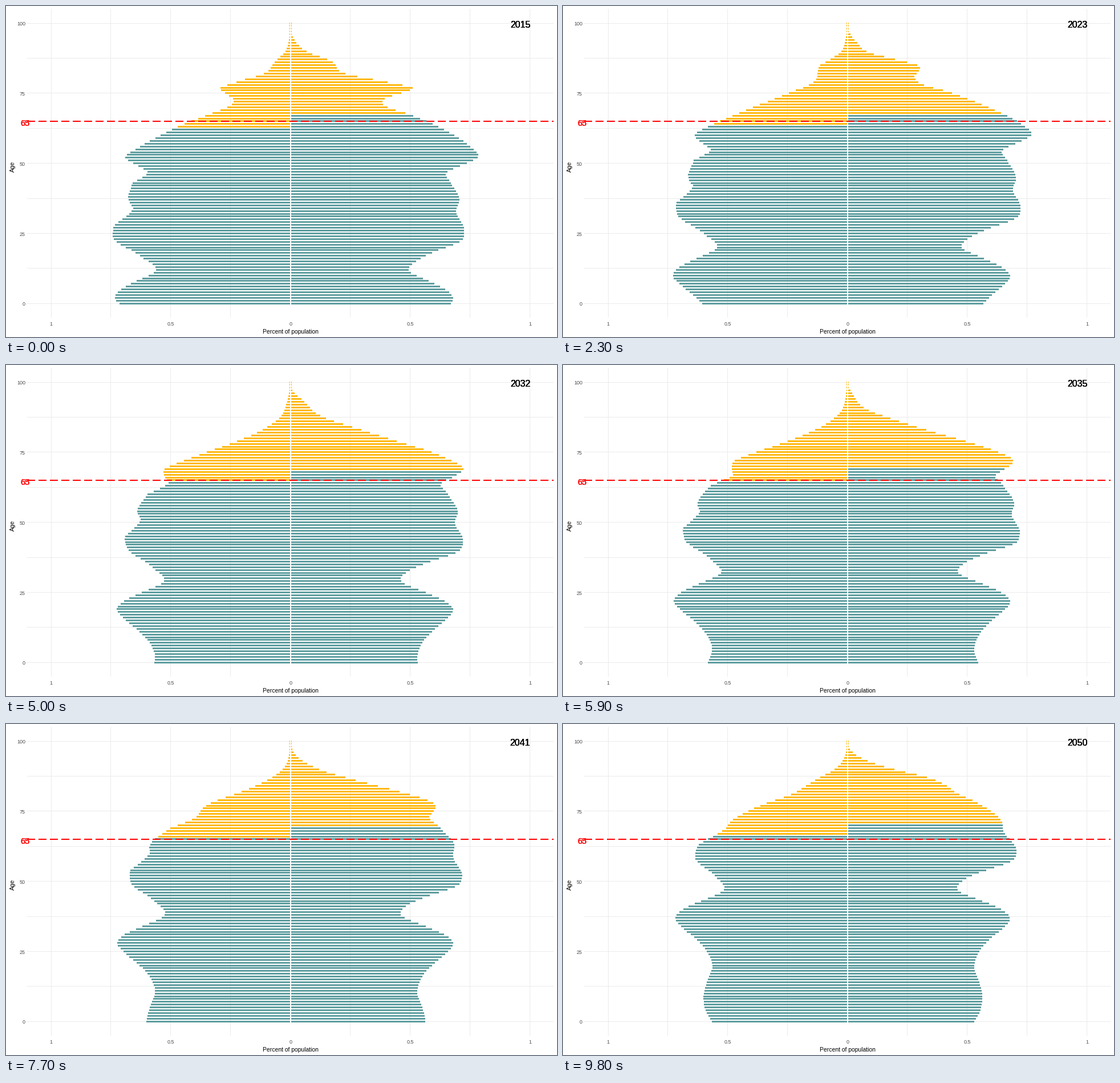
Recreate the animation shown at these times as a matplotlib script. Size 966 px wide and 580 px high, loop 10000 ms.

```python
import numpy as np
import matplotlib.pyplot as plt
from matplotlib.animation import FuncAnimation
from matplotlib.collections import PolyCollection

W, H, DPI = 966, 580, 100
LEFT, RIGHT, TOP, BOTTOM = 37, 960, 5, 546
X0, UNIT = 498.8, 419.75        # zero of the x axis, pixels per percent
Y0, STEP = 521.28, 4.9125       # age zero, pixels per year of age
START = 2015
TEAL, GOLD, GRID = "#5F9EA0", "#FFB90F", "#EBEBEB"
FONT = "Liberation Sans"
AGES = np.arange(101)
ROWS = np.floor(Y0 - STEP * AGES)

# Cohort size by age in 2015; negative ages are later births.
COHORTS = {-35: 223, -32: 232, -26: 237, -20: 230, -16: 223, -10: 232,
           -5: 254, -2: 272, 2: 286, 5: 272, 8: 243, 12: 208, 15: 221,
           19: 260, 22: 297, 26: 305, 33: 291, 37: 297, 43: 282, 47: 276,
           49: 298, 52: 329, 56: 316, 62: 270, 67: 216, 71: 163, 73: 166,
           75: 195, 77: 215, 79: 171, 82: 97, 86: 75, 90: 29, 95: 5, 100: 3}
# Log of the women to men ratio by age in 2015.
SEX_GAP = {0: -.06, 12: -.122, 16: -.115, 22: -.022, 28: -.015, 34: .06,
           43: .02, 47: .1, 52: .13, 63: .28, 72: .49, 80: .61, 90: 1.28}


def smooth(points, x):
    """Cubic Hermite curve through the points."""
    px, py = np.array(list(points.items()), float).T
    slope = np.gradient(py, px)
    x = np.clip(x, px[0], px[-1])
    i = np.clip(np.searchsorted(px, x, "right") - 1, 0, len(px) - 2)
    h = px[i + 1] - px[i]
    t = (x - px[i]) / h
    ease = t * t * (3 - 2 * t)
    bend = h * t * (1 - t) * ((1 - t) * slope[i] - t * slope[i + 1])
    return py[i] * (1 - ease) + py[i + 1] * ease + bend


def pyramid(year, base, growth, modal, frailty, leave, floor):
    """Bar lengths in pixels: ageing cohorts, Gompertz mortality, migration."""
    cohort = AGES - (year - START)
    hazard = lambda age: np.exp(growth * (age - modal))
    weak = np.clip((cohort - frailty[0]) / frailty[1], .6, 1.05)
    loss = weak * (hazard(AGES) - hazard(np.maximum(cohort, 0)))
    moved = .085 * np.exp(-((cohort - leave[0]) / leave[1]) ** 2)
    loss = loss + moved * min((year - START) / 15, 1)
    return np.maximum(base(cohort) * np.exp(-loss), floor)


def women_base(cohort):
    return smooth(COHORTS, cohort)


def men_base(cohort):
    gap = np.interp(cohort, list(SEX_GAP), list(SEX_GAP.values()))
    return women_base(cohort) * np.exp(-gap)


def men(year):
    return pyramid(year, men_base, .095, 79.25, (-20, 80), (19, 11), 1)


def women(year):
    return pyramid(year, women_base, .125, 86.4, (20, 40), (15, 6), 3)


def year_at(frame):
    # One year every three ticks, slightly faster near the end.
    step = (frame + 1) // 3
    return START + step + max(0, step - 27) // 3


def boxes(left, right, top, bottom):
    left, right, top, bottom = np.broadcast_arrays(left, right, top, bottom)
    xs = np.stack([left, right, right, left], axis=1)
    ys = np.stack([top, top, bottom, bottom], axis=1)
    return np.stack([xs, ys], axis=2)


fig = plt.figure(figsize=(W / DPI, H / DPI), dpi=DPI, facecolor="white")
ax = fig.add_axes([0, 0, 1, 1])
ax.set(xlim=(0, W), ylim=(H, 0))
ax.axis("off")


def label(x, y, text, px, color="black", ha="center", copies=1, **kw):
    # Stacked copies thicken the edges of the glyphs.
    return [ax.text(x, y, text, fontsize=px * 72 / DPI, family=FONT, color=color,
                    ha=ha, va="center_baseline", zorder=6, **kw)
            for _ in range(copies)]


def blocks(z, color, verts=()):
    return ax.add_collection(PolyCollection(
        verts, facecolors=color, edgecolors="none", linewidths=0,
        antialiaseds=False, zorder=z), autolim=False)


cols = np.floor(X0 + np.arange(-4, 5) * UNIT / 4)
lines = np.floor(Y0 - np.arange(9) * 12.5 * STEP)
blocks(1, GRID, boxes(cols, cols + 1, TOP, BOTTOM))
blocks(1, GRID, boxes(LEFT, RIGHT, lines, lines + 1))
blocks(4, "white", boxes([498], 500, TOP, BOTTOM))
dashes = np.arange(LEFT, RIGHT, 20)
blocks(5, "red", boxes(dashes, np.minimum(dashes + 14, RIGHT), 201, 203))

for v in np.linspace(-1, 1, 5):
    label(X0 + v * UNIT, 556.5, f"{abs(v):g}", 9, "#4D4D4D")
for age in range(0, 101, 25):
    label(34, Y0 - age * STEP + .7, str(age), 9, "#4D4D4D", "right")
label(498.5, 570, "Percent of population", 10.4)
label(11.5, 276, "Age", 10.6, rotation=90)
label(33, 204, "65", 14.5, "red", copies=4)
year_text = label(901.5, 32, "", 16, copies=4)
bars = blocks(3, TEAL)


def update(frame):
    year = year_at(frame)
    left, right = X0 - .8 - men(year), X0 - .8 + women(year)
    bars.set_verts(np.concatenate([boxes(left, 498, ROWS - 1, ROWS + 2),
                                   boxes(498, right, ROWS - 1, ROWS + 2)]))
    men_retire = 63 + (year - 2014.5) // 8.5
    women_retire = 68 + (year - 2013) // 11
    retired = np.concatenate([AGES >= men_retire, AGES >= women_retire])
    bars.set_facecolor(np.where(retired, GOLD, TEAL).tolist())
    for t in year_text:
        t.set_text(str(year))
    return [bars, *year_text]


anim = FuncAnimation(fig, update, frames=100, interval=100, repeat=True,
                     repeat_delay=0, blit=False)
plt.show()
```
